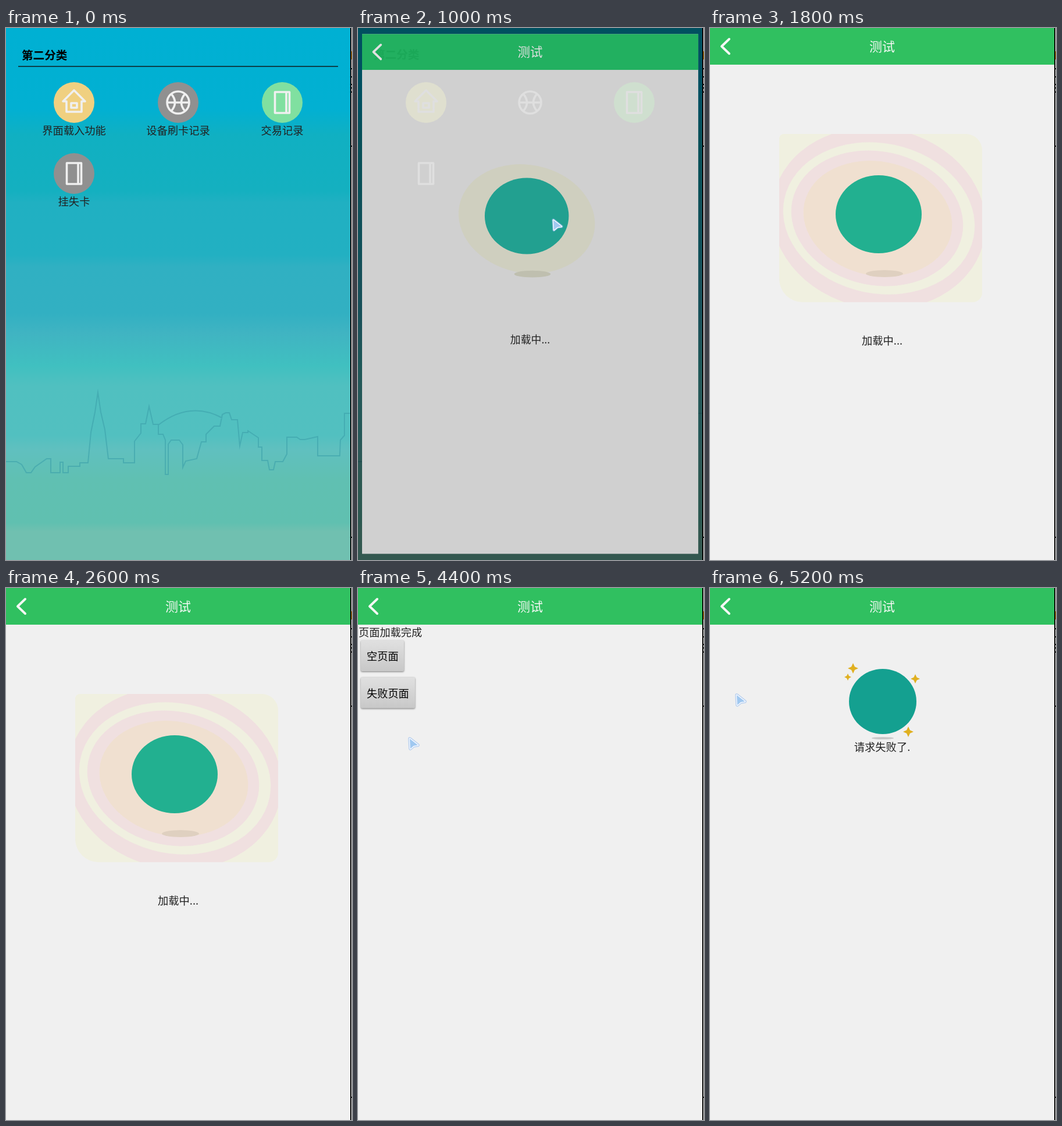
Animation of 595 by 914 pixels, one loop 5.4 s. Source, as an HTML page with a canvas:

```html
<!DOCTYPE html>
<html lang="zh-CN">
<head>
<meta charset="utf-8">
<style>
html, body { margin: 0; width: 100%; height: 100%; overflow: hidden; }
canvas { display: block; }
</style>
</head>
<body>
<canvas width="595" height="914"></canvas>
<script>
const c = document.querySelector('canvas').getContext('2d');
const W = 592, H = 914, STEP = 200, LOOP = 5400, TILT = .2;

const skyline = new Path2D('M0 745H18L27 750L35 764H43L50 754L70 740H77V764H93V746H98V764H107V753H127V747H141L146 695L153 660L158 626L163 660L170 690L176 740H202V747H221V710L232 696V680H240L246 650L253 681H262V698H270L274 708V767H279V715L284 708H298L304 716V755L309 744L328 740L336 711H344V698L358 684H368L372 664L378 661H384L388 673H398L402 718L407 695H416V692L434 704V720H440V743H450L453 759H460L463 745H476L483 732V703H500L506 707H514L536 702V735H574L575 708L582 700V662H592M262 682Q316 640 372 670');
const house = new Path2D('M-19 -2L0 -21L19 -2H13V16H-13V-2ZM-5 1H5V9H-5Z');
const ball = new Path2D('M19 0A19 19 0 1 1 -19 0A19 19 0 1 1 19 0ZM-19 0H19M-12 -15Q1 0 -12 15M12 -15Q-1 0 12 15');
const book = new Path2D('M-12.5 -18H12.5V18H-12.5ZM7 -18V18');
const chevron = new Path2D('M33 19L20 31.5L33 44');
const arrow = new Path2D('M3 3L17 14L10 15L4 20Z');

const icons = [
  [117, 128, '#f0d080', '#dfdfcf', house, '界面载入功能'],
  [296, 128, '#909090', null, ball, '设备刷卡记录'],
  [475, 128, '#80e0a0', '#cfdfcf', book, '交易记录'],
  [117, 250, '#909090', null, book, '挂失卡']
];

// Pointer tip for each time step where it is visible
const pointer = {
  1: [480, 330], 2: [300, 215], 3: [160, 140], 4: [127, 124], 5: [333, 327], 6: [561, 415],
  20: [230, 374], 21: [230, 374], 22: [86, 256], 23: [62, 202], 24: [46, 178], 25: [44, 181], 26: [43, 181]
};

function rect(x, y, w, h, color) {
  c.fillStyle = color;
  c.fillRect(x, y, w, h);
}

function ellipse(x, y, rx, ry, color, tilt = 0) {
  c.fillStyle = color;
  c.beginPath();
  c.ellipse(x, y, rx, ry, tilt, 0, 7);
  c.fill();
}

function text(str, x, y, size, color = '#222', align = 'center', weight = 400) {
  c.font = `${weight} ${size}px "Noto Sans CJK SC", "Noto Sans CJK", sans-serif`;
  c.textAlign = align;
  c.fillStyle = color;
  c.fillText(str, x, y);
}

function line(path, color, width) {
  c.strokeStyle = color;
  c.lineWidth = width;
  c.stroke(path);
}

function gradient(y0, y1, stops) {
  const g = c.createLinearGradient(0, y0, 0, y1);
  for (const [y, color] of stops) g.addColorStop((y - y0) / (y1 - y0), color);
  return g;
}

function drawIcons(faded) {
  for (const [x, y, color, pale, path, label] of icons) {
    const fill = faded ? pale : color;
    if (fill) ellipse(x, y, 35, 35, fill);
    c.save();
    c.translate(x, y);
    c.lineJoin = 'round';
    line(path, faded ? '#dfdfdf' : '#f0f0f0', 3.6);
    c.restore();
    if (!faded) text(label, x, y + 55, 18.3);
  }
}

function home() {
  rect(0, 0, W, H, gradient(0, H, [
    [0, '#00b0d3'], [140, '#02b0d2'], [185, '#10b0c2'], [280, '#14b0c0'], [300, '#20b0c2'],
    [390, '#22b0c2'], [410, '#30b0c2'], [490, '#32b0c2'], [525, '#40b4c2'], [580, '#40c0c0'],
    [615, '#50c0c0'], [700, '#52c0c0'], [725, '#60c0bf'], [775, '#60c0b2'], [850, '#60c0b0'],
    [865, '#70c0b0'], [H, '#70c0b0']
  ]));
  line(skyline, 'rgba(60,160,170,.6)', 2);
  text('第二分类', 27, 54, 19.6, '#000', 'left', 700);
  rect(21, 65.3, 550, 1.4, '#111');
  drawIcons(false);
}

function page(bg, bar) {
  rect(0, 0, W, H, bg);
  rect(0, 0, W, 63, bar);
}

function heading(ink) {
  c.lineCap = c.lineJoin = 'round';
  line(chevron, ink, 4);
  c.lineCap = 'butt';
  c.lineJoin = 'miter';
  text('测试', 296, 40, 22, ink);
}

function loader(faded) {
  if (faded) {
    ellipse(290, 325, 121, 95, '#cfcfbf', TILT);
  } else {
    c.save();
    c.beginPath();
    c.roundRect(119, 182, 349, 289, [8, 28, 16, 40]);
    c.clip();
    rect(119, 182, 349, 289, '#f0f0e0');
    ellipse(290, 327, 185, 155, '#f0e0e0', TILT);
    ellipse(290.5, 327, 166, 129, '#f0f0e0', TILT);
    ellipse(287.5, 327, 149, 115, '#f0e0e0', TILT);
    ellipse(288.5, 327.5, 129, 98, '#f0e0d0', TILT);
    c.restore();
  }
  ellipse(300, 422, 32, 6, faded ? '#bfbfaf' : '#dfd0c0');
  ellipse(290, 320, 74, 67, faded ? '#22a090' : '#22b090');
  text('加载中...', 296, 544, 18.3);
}

function shrunk(draw) {
  c.save();
  c.translate(7, 10.4);
  c.scale(.9765, .977);
  draw();
  c.restore();
}

function opening() {
  home();
  rect(0, 0, W, H, 'rgba(0,0,0,.54)');
  shrunk(() => page('#d0d0d0', '#22b060'));
  text('第二分类', 27, 53, 19.6, 'rgba(20,160,80,.5)', 'left', 700);
  drawIcons(true);
  shrunk(() => {
    heading('#e0e0e0');
    loader(true);
  });
}

function button(label, y, w) {
  c.save();
  c.shadowColor = 'rgba(0,0,0,.5)';
  c.shadowBlur = 3;
  c.shadowOffsetY = 1;
  c.fillStyle = gradient(y, y + 53, [[y, '#e0e0e0'], [y + 53, '#c8c8c8']]);
  c.beginPath();
  c.roundRect(5, y, w, 53, 2);
  c.fill();
  c.restore();
  text(label, 15, y + 34, 18.2, '#000', 'left');
}

function loaded() {
  text('页面加载完成', 1, 83, 18.2, '#222', 'left');
  button('空页面', 90, 74);
  button('失败页面', 153.5, 93);
}

function sparkle(x, y, r) {
  c.fillStyle = '#e0b020';
  c.beginPath();
  for (let i = 0; i < 8; i++) {
    const d = i % 2 ? r * .45 : r, a = i * Math.PI / 4;
    c.lineTo(x + d * Math.cos(a), y + d * Math.sin(a));
  }
  c.fill();
}

function failed() {
  ellipse(297, 258, 19, 2, '#c8c8c8');
  ellipse(297, 195, 58, 56, '#14a090');
  sparkle(246, 138, 9);
  sparkle(237, 153, 6);
  sparkle(353, 156, 8);
  sparkle(341, 247, 9);
  text('请求失败了.', 296, 280, 18.3);
}

function drawPointer(x, y) {
  c.save();
  c.translate(x, y);
  c.lineJoin = 'round';
  line(arrow, 'rgba(130,175,235,.55)', 5.5);
  line(arrow, '#f4f8ff', 3);
  c.fillStyle = '#a0c8f0';
  c.fill(arrow);
  c.restore();
}

function edge() {
  rect(W, 0, 2, H, '#000');
  rect(594, 0, 1, H, '#fff');
  rect(594, 40, 1, 14, '#e0a020');
  for (const y of [69, 83, 96, 102, 109, 202, 874]) rect(594, y, 1, 2, '#000');
}

function frame(now) {
  const step = Math.floor(now % LOOP / STEP);
  if (step < 5) home();
  else if (step === 5) opening();
  else {
    page('#f0f0f0', '#30c060');
    heading('#f4f8f4');
    if (step < 19) loader(false);
    else if (step < 25) loaded();
    else failed();
  }
  if (pointer[step]) drawPointer(...pointer[step]);
  edge();
  requestAnimationFrame(frame);
}
requestAnimationFrame(frame);
</script>
</body>
</html>
```
